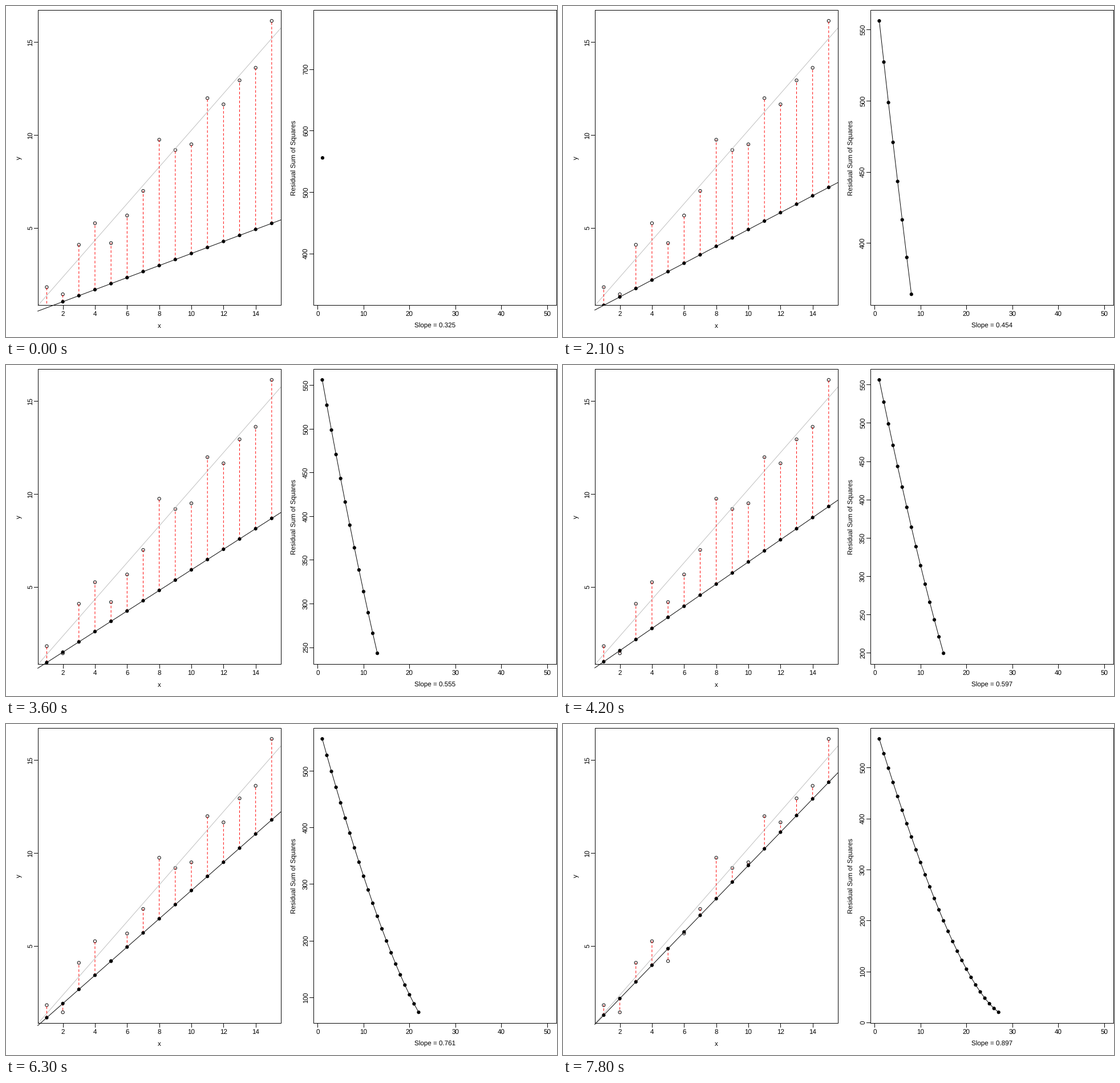
Animation of 966 by 580 pixels, one loop 8000 ms. Source, as a matplotlib script:

```python
import math

import matplotlib.pyplot as plt
import numpy as np
from matplotlib.animation import FuncAnimation
from matplotlib.collections import LineCollection, PatchCollection
from matplotlib.patches import Circle, Rectangle

WIDTH, HEIGHT, DPI = 966, 580, 100
PX = 72 / DPI                  # points per pixel
SCALE = HEIGHT / 600
LINE = 14.4 * SCALE            # one margin line of text
STROKE = SCALE * PX
RADIUS = 2.7 * SCALE
TICK = LINE / 2

plt.rcParams.update({
    "font.family": "Liberation Sans",
    "font.size": 12 * SCALE * PX,
    "text.hinting": "none",
})

x = np.arange(1, 16)
y = np.array([1.80, 1.415, 4.083, 5.246, 4.175, 5.662, 6.985, 9.745,
              9.191, 9.498, 11.985, 11.652, 12.945, 13.622, 16.149])
best_slope, intercept = np.polyfit(x, y, 1)

STEPS = 50
slopes = np.tan(np.linspace(math.pi / 10, 3.5 * math.pi / 10, STEPS))
rss = np.array([np.sum((y - intercept - b * x) ** 2) for b in slopes])

fig = plt.figure(figsize=(WIDTH / DPI, HEIGHT / DPI), dpi=DPI, facecolor="white")
page = fig.add_axes([0, 0, 1, 1])


def padded(low, high):
    """Axis limits with a 4% margin; a single value gets 40% either way."""
    if low == high:
        low, high = 0.6 * low, 1.4 * high
    pad = 0.04 * (high - low)
    return low - pad, high + pad


def pretty_ticks(low, high):
    """Round tick values inside the limits, about five of them."""
    cell = (high - low) / 5
    base = 10 ** math.floor(math.log10(cell))
    unit = base
    for factor, bias in ((2, 0.8), (5, 1.7), (10, 0.8)):
        if factor * base - cell >= bias * (cell - unit):
            break
        unit = factor * base
    return unit * np.arange(math.ceil(low / unit), math.floor(high / unit) + 1)


class Panel:
    def __init__(self, offset, xlim, ylim):
        self.left = offset + 4 * LINE
        self.right = offset + WIDTH / 2 - 0.1 * LINE
        self.top = 0.5 * LINE
        self.bottom = HEIGHT - 4 * LINE
        self.xlim, self.ylim = xlim, ylim
        self.area = Rectangle((self.left, self.top), self.right - self.left,
                              self.bottom - self.top, transform=page.transData)

    def px(self, value):
        low, high = self.xlim
        return self.left + (value - low) / (high - low) * (self.right - self.left)

    def py(self, value):
        low, high = self.ylim
        return self.bottom - (value - low) / (high - low) * (self.bottom - self.top)

    def line(self, xs, ys, color="black"):
        page.plot(self.px(xs), self.py(ys), color=color, lw=STROKE,
                  snap=False, clip_path=self.area)

    def trend(self, slope, color):
        ends = np.array(self.xlim)
        self.line(ends, intercept + slope * ends, color)

    def dots(self, xs, ys, fill):
        circles = [Circle(p, RADIUS) for p in zip(self.px(xs), self.py(ys))]
        marks = PatchCollection(circles, facecolor=fill, edgecolor="black",
                                linewidth=STROKE, zorder=2)
        page.add_collection(marks)
        marks.set_clip_path(self.area)

    def residuals(self, fitted):
        px, start, end = self.px(x), self.py(fitted), self.py(y)
        bars = [[(a, b), (a, c)] for a, b, c in zip(px, start, end)]
        dashes = LineCollection(bars, colors="red", linewidths=STROKE,
                                linestyles=[(0, (4, 4))], capstyle="round",
                                snap=False, zorder=2)
        page.add_collection(dashes)
        dashes.set_clip_path(self.area)

    def frame(self, xlabel, ylabel):
        page.add_patch(Rectangle((self.left, self.top), self.right - self.left,
                                 self.bottom - self.top, fill=False, lw=STROKE,
                                 zorder=3))
        for value in pretty_ticks(*self.xlim):
            at = self.px(value)
            page.plot([at, at], [self.bottom, self.bottom + TICK], "k", lw=STROKE)
            label(at, self.bottom + 1.34 * LINE, f"{value:g}")
        for value in pretty_ticks(*self.ylim):
            at = self.py(value)
            page.plot([self.left - TICK, self.left], [at, at], "k", lw=STROKE)
            label(self.left - 0.7 * LINE, at, f"{value:g}", 90)
        label((self.left + self.right) / 2, self.bottom + 2.84 * LINE, xlabel)
        label(self.left - 2.2 * LINE, (self.top + self.bottom) / 2, ylabel, 90)


def label(px, py, text, angle=0):
    page.text(px, py, text, rotation=angle, rotation_mode="anchor",
              ha="center", va="baseline")


def draw(tick):
    step = tick // 3
    slope = slopes[step]
    page.clear()
    page.set(xlim=(0, WIDTH), ylim=(HEIGHT, 0))
    page.axis("off")

    data = Panel(0, padded(x[0], x[-1]), padded(y.min(), y.max()))
    fitted = intercept + slope * x
    data.dots(x, y, "none")
    data.trend(best_slope, "#bebebe")
    data.trend(slope, "black")
    data.residuals(fitted)
    data.dots(x, fitted, "black")
    data.frame("x", "y")

    seen = rss[:step + 1]
    count = np.arange(1, step + 2)
    curve = Panel(WIDTH / 2, padded(1, STEPS), padded(seen.min(), seen.max()))
    curve.line(count, seen)
    curve.dots(count, seen, "black")
    curve.frame(f"Slope = {slope:.3f}", "Residual Sum of Squares")
    return []


animation = FuncAnimation(fig, draw, frames=80, interval=100, repeat=True,
                          repeat_delay=0, init_func=lambda: draw(0))
plt.show()
```
